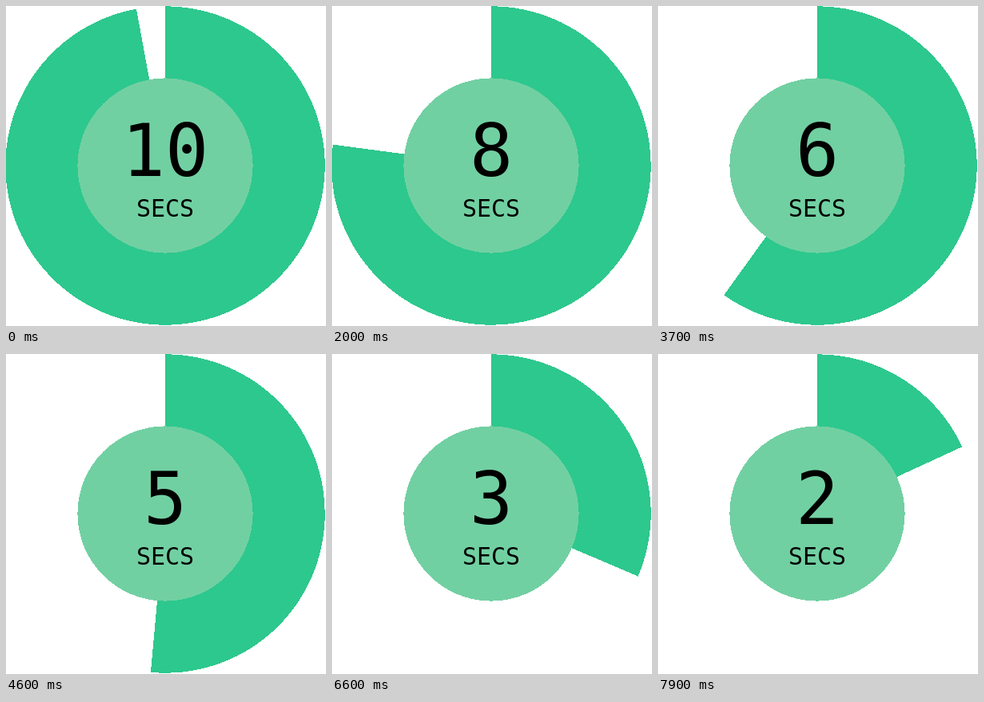
An HTML page that plays this animation: 400x401 px, repeating every 8000 ms.

```html
<!DOCTYPE html>
<html lang="en">
<head>
<meta charset="utf-8">
<title>Countdown</title>
<style>
  html, body { margin: 0; width: 100%; height: 100%; overflow: hidden; background: #fff; }
  svg { display: block; width: 400px; height: 401px; }
  path, circle { shape-rendering: crispEdges; }
  text { font-family: "DejaVu Sans Mono", monospace; text-anchor: middle; }
</style>
</head>
<body>
<svg viewBox="0 0 400 401">
  <path id="sector" fill="#2dc88e"/>
  <circle cx="199" cy="200" r="109.6" fill="#71d0a2"/>
  <text id="count" x="199" y="213" font-size="90"></text>
  <text x="199" y="264" font-size="30">SECS</text>
</svg>
<script>
const LOOP = 8000, STEP = 100, CX = 199, CY = 200, R = 199.7;
const START = 10, HALF_SECOND = 18; // degrees

// Each half second has the same slightly uneven rhythm of five ticks
const rhythm = [0.4, 2.8, 8.3, 11.4, 14.8];

const sector = document.getElementById('sector');
const count = document.getElementById('count');

function draw(time) {
  const tick = Math.floor(time % LOOP / STEP);
  const gone = START + HALF_SECOND * Math.floor(tick / 5) + rhythm[tick % 5];
  const a = gone * Math.PI / 180;
  const x = CX - R * Math.sin(a), y = CY - R * Math.cos(a);
  const large = gone < 180 ? 1 : 0;
  sector.setAttribute('d', `M${CX} ${CY}V${CY - R}A${R} ${R} 0 ${large} 1 ${x} ${y}Z`);
  count.textContent = Math.round(10 - gone / 36);
}

const start = performance.now();
function animate() {
  draw(performance.now() - start);
  requestAnimationFrame(animate);
}
animate();
</script>
</body>
</html>
```
